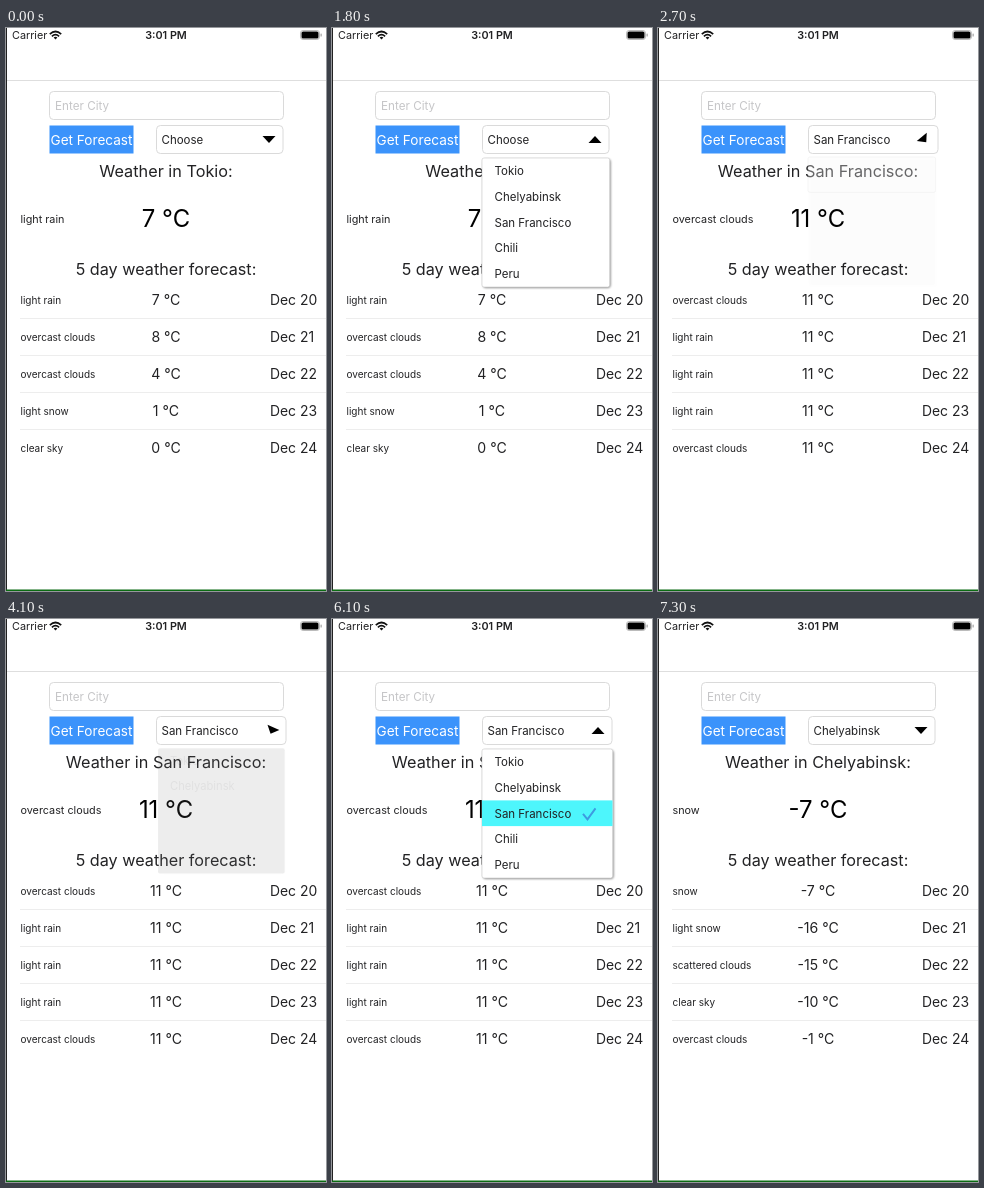
Write an HTML page that moves like this. It is 320 px wide and 563 px high and loops after 8 s.

```html
<!DOCTYPE html>
<html lang="en">
<head>
<meta charset="utf-8">
<title>Weather forecast</title>
<style>
  html, body { margin: 0; width: 100%; height: 100%; overflow: hidden; background: #fff; }
  svg { display: block; width: 100%; height: 100%; font-family: Inter, Roboto, sans-serif; fill: #222224; }
</style>
</head>
<body>
<svg id="stage" viewBox="0 0 320 563"></svg>
<script>
const LOOP = 8000, STEP = 100, OPEN_MS = 600, CLOSE_MS = 850;
const TOP = 130, ROW = 25.7, LIST_H = 129;
const CITIES = ['Tokio', 'Chelyabinsk', 'San Francisco', 'Chili', 'Peru'];
const REPORTS = {
  'Tokio': [['light rain', 7], ['overcast clouds', 8], ['overcast clouds', 4], ['light snow', 1], ['clear sky', 0]],
  'San Francisco': [['overcast clouds', 11], ['light rain', 11], ['light rain', 11], ['light rain', 11], ['overcast clouds', 11]],
  'Chelyabinsk': [['snow', -7], ['light snow', -16], ['scattered clouds', -15], ['clear sky', -10], ['overcast clouds', -1]]
};
const VISITS = [
  { open: 20, close: 2010, label: 'Choose', city: 'Tokio', pick: 'San Francisco' },
  { open: 4020, close: 6420, label: 'San Francisco', city: 'San Francisco', pick: 'Chelyabinsk' }
];

const stage = document.getElementById('stage');
const clamp = v => Math.max(0, Math.min(1, v));
const right = label => label === 'San Francisco' ? 280 : 277;

const text = (x, y, size, str, attrs = '') =>
  `<text x="${x}" y="${y}" font-size="${size}" ${attrs}>${str}</text>`;
const mid = (y, size, str, attrs = '') => text(160, y, size, str, 'text-anchor="middle" ' + attrs);
const rect = (x, y, w, h, attrs) =>
  `<rect x="${x}" y="${y}" width="${w}" height="${Math.max(0, h)}" ${attrs}/>`;
const field = (x, y, w, h) => rect(x, y, w, h, 'rx="4" fill="#fff" stroke="#dadada"');

function chrome() {
  return rect(0, 0, 320, 563, 'fill="#fff"')
    + text(6, 10.8, 10.8, 'Carrier')
    + `<g fill="none" stroke="#111" stroke-width="1.7">
        <path d="M43.8 6.2Q49.5 .8 55.2 6.2M45.9 8.4Q49.5 5 53.1 8.4"/>
        <path d="M47.6 9.6Q49.5 8 51.4 9.6L49.5 11.6Z" fill="#111" stroke="none"/></g>`
    + mid(10.8, 10.8, '3:01 PM', 'font-weight="600"')
    + rect(294.5, 2.5, 19, 9, 'rx="2.6" fill="none" stroke="#bbb"')
    + rect(295.5, 3.5, 17, 7, 'rx="1.6" fill="#000"')
    + rect(314.5, 5.5, 1.3, 3, 'rx=".6" fill="#aaa"')
    + rect(0, 52, 320, 1, 'fill="#dedede"')
    + field(43.5, 63.5, 234, 28)
    + text(49, 81.5, 11.7, 'Enter City', 'fill="#c6c6c8"')
    + rect(43.5, 97.5, 84, 28, 'fill="#3b93fb"')
    + text(85.5, 116.7, 13.6, 'Get Forecast', 'text-anchor="middle" fill="#fff"');
}

function forecast(city) {
  const days = REPORTS[city];
  let out = mid(149, 16.25, `Weather in ${city}:`)
    + text(14.5, 194.5, 10.8, days[0][0])
    + mid(199.2, 23.9, days[0][1] + ' °C', 'fill="#000"')
    + mid(247.3, 16.2, '5 day weather forecast:');
  days.forEach(([sky, temp], i) => {
    const y = 272 + 37 * i;
    out += text(14.5, y + 3.8, 10, sky) + mid(y + 5, 14.1, temp + ' °C')
      + text(264, y + 5, 13.9, 'Dec ' + (20 + i));
    if (i < 4) out += rect(14, y + 18, 306, 1, 'fill="#ededed"');
  });
  return out;
}

function picker(label, turn) {
  const r = right(label);
  return field(150.5, 97.5, r - 150.5, 28)
    + text(155.5, 115.7, 11.5, label)
    + `<path d="M-6.5-3.5H6.5L0 3.5Z" fill="#000" transform="translate(${r - 14} 111.5) rotate(${turn})"/>`;
}

function rows(v, w, y, pressed) {
  return CITIES.map((city, i) => {
    const top = y + ROW * i, chosen = city === v.label;
    let out = '';
    if (chosen || (pressed && city === v.pick)) out += rect(150, top, w, ROW, 'fill="#4df6fc"');
    out += text(162.5, top + 17.2, 11.5, city);
    if (chosen) out += `<path d="M251 ${top + 13.5}l4.5 5.5l8-11" fill="none" stroke="#3d9be0" stroke-width="2"/>`;
    return out;
  }).join('');
}

function list(v, t) {
  const w = right(v.label) + .7 - 150, since = t - v.close;
  const shown = clamp((t - v.open) / OPEN_MS);
  const closing = since > 0;
  const y = TOP - (closing ? 1 : 0);
  const h = closing ? LIST_H * (1 - since / 950) : LIST_H;
  const alpha = closing ? 1 - clamp((since - 380) / 450) : shown;
  const tone = Math.round(128 + 127 * clamp(shown * 2 - .27));
  const clipH = closing ? h : LIST_H * clamp(.26 + shown);
  const scale = .965 + .035 * shown, cx = 150 + w / 2, cy = TOP + LIST_H / 2;
  let out = '';
  if (closing) {
    const dim = .4 * clamp(1 - since / 700);
    out += rect(151, y + 1, w + .5, LIST_H, `rx="2" fill="#000" opacity="${dim * .35}" filter="url(#soft)"`)
      + rect(150, y, w, LIST_H - 1, `rx="2" fill="#000" opacity="${dim}"`);
  }
  out += `<g opacity="${alpha}" transform="translate(${cx} ${cy - 3 * (1 - shown)}) scale(${scale}) translate(${-cx} ${-cy})">`;
  if (!closing) out += rect(151, y + 1, w, h, `rx="3" fill="#000" opacity="${.45 * shown}" filter="url(#soft)"`);
  out += rect(150, y, w, h, `rx="2" fill="rgb(${tone},${tone},${tone})" stroke="#ccc" stroke-width="${shown * .6}"`);
  if (since < 250) {
    out += `<clipPath id="view">${rect(150, y, w, clipH, '')}</clipPath>`
      + `<g clip-path="url(#view)">${rows(v, w, y, since > -200)}</g>`;
  }
  return out + '</g>';
}

function draw(t) {
  const v = t < 4000 ? VISITS[0] : VISITS[1];
  const since = t - v.close;
  const label = since > 250 ? v.pick : v.label;
  const city = since > 80 ? v.pick : v.city;
  const turn = since > 0
    ? 180 + 180 * clamp(since / CLOSE_MS) ** 1.2
    : 180 * clamp((t - v.open) / OPEN_MS);
  const visible = t > v.open && since < 850;
  stage.innerHTML = '<filter id="soft"><feGaussianBlur stdDeviation="1"/></filter>'
    + chrome() + forecast(city) + picker(label, turn)
    + (visible ? list(v, t) : '')
    + rect(0, 0, 1, 563, 'fill="#222"') + rect(0, 561.5, 320, 1.5, 'fill="#0b6b12"');
}

let last = -1;
function tick(now) {
  const t = Math.floor((now % LOOP) / STEP) * STEP;
  if (t !== last) draw(last = t);
  requestAnimationFrame(tick);
}
draw(0);
requestAnimationFrame(tick);
</script>
</body>
</html>
```
